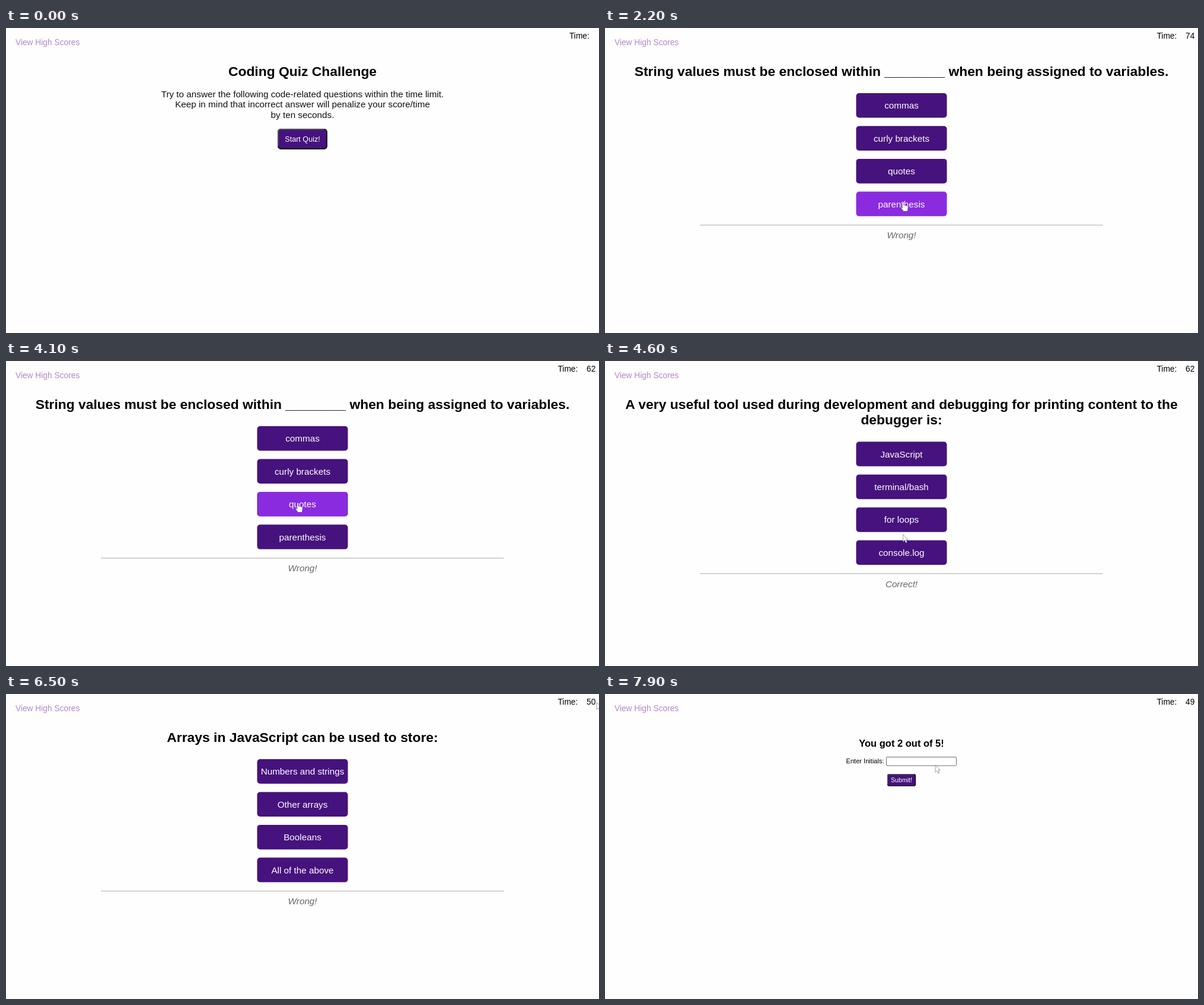
An HTML page that plays this animation: 1000x515 px, repeating every 8000 ms.

```html
<!DOCTYPE html>
<html lang="en">
<head>
<meta charset="utf-8">
<title>Coding Quiz</title>
<style>
  html, body { margin: 0; width: 100%; height: 100%; overflow: hidden; background: #fefefe; }
  svg { display: block; width: 100vw; height: 100vh; font-family: "Liberation Sans", Arial, sans-serif; }
</style>
</head>
<body>
<svg id="stage" viewBox="0 0 1000 515"></svg>
<script>
const LOOP = 8000, STEP = 100;
const INDIGO = '#46127d', VIOLET = '#8a2be0';
const stage = document.getElementById('stage');

const questions = [
  { from: 1100, title: ['The condition in an if/else statement is enclosed with ________'],
    options: ['quotes', 'curly brackets', 'parenthesis', 'square brackets'], verdict: '' },
  { from: 2200, title: ['String values must be enclosed within ________ when being assigned to variables.'],
    options: ['commas', 'curly brackets', 'quotes', 'parenthesis'], verdict: 'Wrong!' },
  { from: 4200, title: ['A very useful tool used during development and debugging for printing content to the', 'debugger is:'],
    options: ['JavaScript', 'terminal/bash', 'for loops', 'console.log'], verdict: 'Correct!' },
  { from: 5000, title: ['Commonly used data types do NOT include:'],
    options: ['Strings', 'Booleans', 'Alerts', 'Numbers'], verdict: 'Correct!' },
  { from: 5700, title: ['Arrays in JavaScript can be used to store:'],
    options: ['Numbers and strings', 'Other arrays', 'Booleans', 'All of the above'], verdict: 'Wrong!' }
];
const END = 7300;

// [time, value]
const clock = [[0, ''], [2100, 74], [3100, 63], [4100, 62], [5100, 61], [6100, 50], [7100, 49]];

// [time, x, y] of the pointer tip
const path = [
  [200, 625, 186], [300, 503, 186], [1200, 503, 186], [1400, 503, 240], [1600, 503, 240],
  [2100, 503, 293], [2400, 503, 293], [3100, 996, 40], [3300, 996, 40], [3900, 492, 239],
  [4200, 492, 239], [4800, 508, 320], [5000, 508, 320], [5200, 508, 258], [5500, 505, 188],
  [5700, 505, 188], [6300, 996, 14], [6500, 996, 14], [7100, 500, 236], [7400, 500, 236], [7900, 557, 120]
];

const latest = (list, t, time) => list.filter(item => time(item) <= t).pop();

function pointerAt(t) {
  if (t < path[0][0]) return null;
  const i = path.findIndex(key => key[0] > t);
  if (i < 0) return path.at(-1).slice(1);
  const [t0, x0, y0] = path[i - 1], [t1, x1, y1] = path[i];
  const k = (t - t0) / (t1 - t0);
  return [x0 + (x1 - x0) * k, y0 + (y1 - y0) * k];
}

const inside = (p, x, y, w, h, pad = 0) =>
  !!p && p[0] > x + pad && p[0] < x + w - pad && p[1] > y + pad && p[1] < y + h - pad;

const text = (str, x, y, size, attrs = '') =>
  `<text x="${x}" y="${y}" font-size="${size}" ${attrs}>${str}</text>`;
const centered = (str, y, size, attrs = '') => text(str, 500, y, size, 'text-anchor="middle" ' + attrs);
const box = (x, y, w, h, r, attrs) =>
  `<rect x="${x}" y="${y}" width="${w}" height="${h}" rx="${r}" ${attrs}/>`;

// Button with a raised (or pressed) bevel
function bevel(x, y, w, h, r, line, fill, pressed) {
  const [light, dark] = pressed ? ['#111', '#55505c'] : ['#55505c', '#111'];
  return box(x, y, w, h, r, `fill="${fill}" stroke="${dark}" stroke-width="${line}"`) +
    `<path d="M${x} ${y + h - r}V${y + r}q0 ${-r} ${r} ${-r}H${x + w - r}" fill="none" stroke="${light}" stroke-width="${line}"/>`;
}

function header(t) {
  const left = latest(clock, t, c => c[0])[1];
  return text('View High Scores', 16, 28.5, 13.75, 'fill="#b287c8"') +
    text('Time:', left ? 930.5 : 950, 18, 13.72) + text(left, 979, 18, 13.72);
}

function intro(t, pointer) {
  const over = inside(pointer, 458, 170, 84, 35);
  return {
    hand: over,
    art: centered('Coding Quiz Challenge', 80.7, 22.87, 'font-weight="bold"') +
      ['Try to answer the following code-related questions within the time limit.',
       'Keep in mind that incorrect answer will penalize your score/time',
       'by ten seconds.'].map((line, i) => centered(line, 117 + i * 17.3, 15.25, 'fill="#111"')).join('') +
      bevel(459, 171, 82, 33, 4.5, 1.9, over ? VIOLET : INDIGO, t >= 900) +
      centered('Start Quiz!', 192, 12.6, 'fill="#fff"')
  };
}

function quiz(t, pointer, { title, options, verdict }) {
  const shift = (title.length - 1) * 26.3;
  let hand = false;
  let art = title.map((line, i) => centered(line, 80.7 + i * 26.3, 22.87, 'font-weight="bold"')).join('');
  options.forEach((label, i) => {
    const y = 110 + shift + i * 55.45;
    const over = inside(pointer, 423.5, y, 153, 41.5);
    hand ||= inside(pointer, 423.5, y, 153, 41.5, 5);
    art += box(423.5, y, 153, 41.5, 5, `fill="${over ? VIOLET : INDIGO}"`);
    if (over && t >= 4000) {
      art += `<path d="M424.5 ${y + 3}v36M575.5 ${y + 3}v36" stroke="#301060" stroke-dasharray="1 1" opacity=".7"/>`;
    }
    art += centered(label, y + 26.2, 15.25, 'fill="#fff"');
  });
  art += box(160, 332 + shift, 679.5, 1.5, 0, 'fill="#c6c6c6"') +
    centered(verdict, 355.2 + shift, 15.25, 'font-style="italic" fill="#666"');
  return { hand, art };
}

function result() {
  return {
    hand: false,
    art: centered('You got 2 out of 5!', 88.5, 16.5, 'font-weight="bold"') +
      text('Enter Initials:', 406.5, 116.5, 11.1) +
      box(474.5, 106.5, 118, 14.5, 1.5, 'fill="#fff" stroke="#6c6c6c"') +
      bevel(476.7, 135.7, 46.8, 19.4, 2.5, 1.4, INDIGO) +
      centered('Submit!', 149, 10.6, 'fill="#fff"')
  };
}

function cursor([x, y], hand) {
  const shape = hand
    ? 'M-1.2 1q1.3-2 2.5 0V6l5.5 1.3q1.7.6 1.5 2.5L7.2 16.5H.3L-3.6 11q-.6-2 1-1.6L-1.2 11z'
    : 'M0 0V12.2L2.8 9.6 4.8 14 6.7 13.2 4.8 8.8H8.6z';
  return `<path transform="translate(${x} ${y})" d="${shape}" fill="#fff" stroke="${hand ? '#5b3a85' : '#777'}" stroke-width=".7"/>`;
}

function draw(t) {
  const pointer = pointerAt(t);
  const question = latest(questions, t, q => q.from);
  const scene = t >= END ? result() : question ? quiz(t, pointer, question) : intro(t, pointer);
  stage.innerHTML = header(t) + scene.art + (pointer ? cursor(pointer, scene.hand) : '');
}

let shown = -1;
const start = performance.now();
function tick() {
  const t = Math.floor((performance.now() - start) % LOOP / STEP) * STEP;
  if (t !== shown) draw(shown = t);
  requestAnimationFrame(tick);
}
tick();
</script>
</body>
</html>
```
